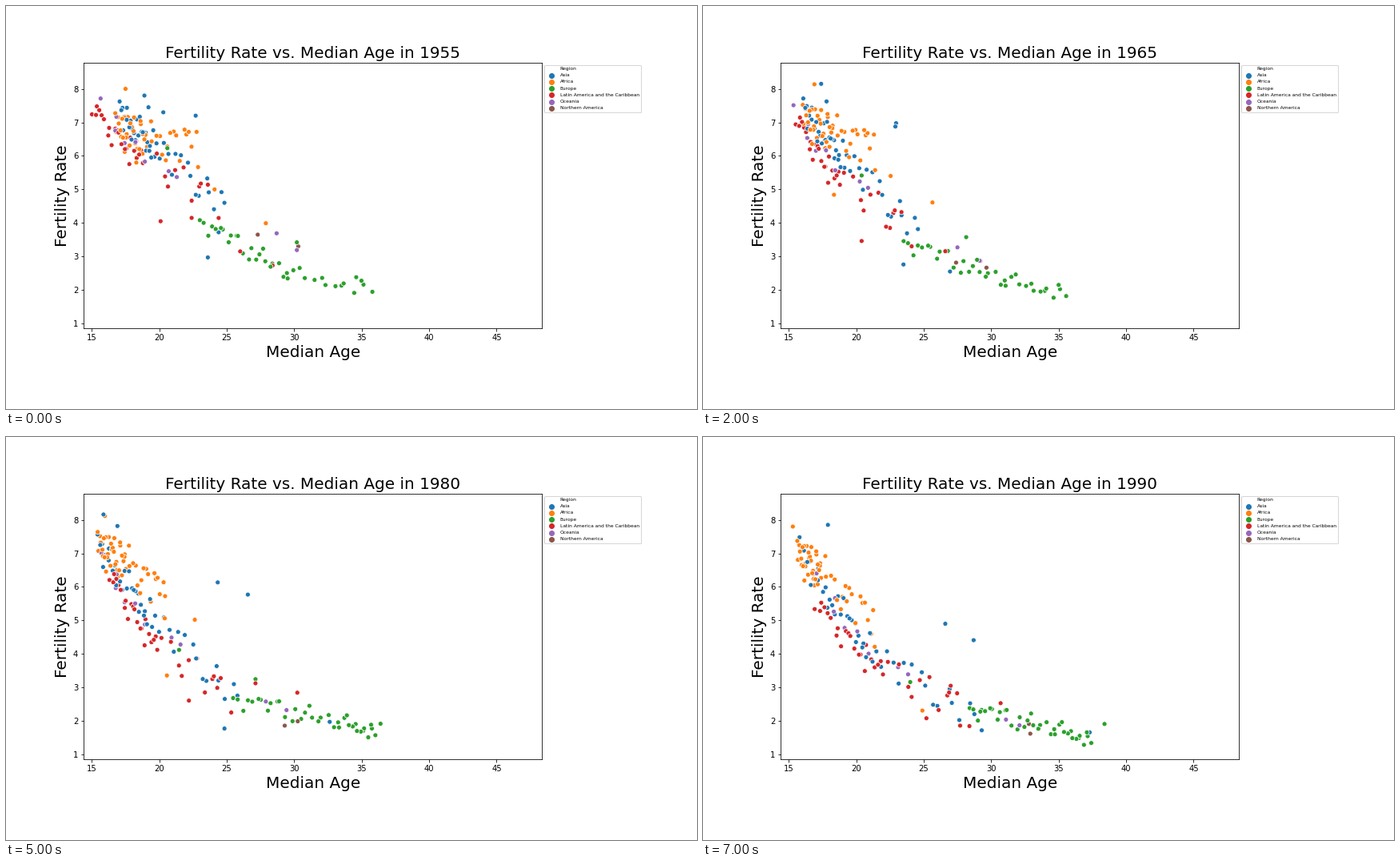
A matplotlib script for the animation above (8 s loop, 864 px wide and 504 px high).

```python
import numpy as np
import matplotlib.pyplot as plt
from matplotlib.animation import FuncAnimation

W, H, DPI = 864, 504, 72
KEY_YEARS = [1955, 1975, 1990]
KNOTS = [0, 0.65, 1]
rng = np.random.default_rng(7)


class Region:
    """Countries scattered along a spine that moves, plus a few lone tracks.

    A spine has three ages and three rates per key year,
    a track one (age, rate) per key year.
    """

    def __init__(self, name, colour, tracks, n=0, spread=0, spine=()):
        self.name, self.colour = name, colour
        lone = np.reshape(tracks, (-1, 3, 2)).swapaxes(0, 1)
        u = (np.arange(n) + rng.random(n)) / max(n, 1)
        noise = spread * rng.uniform(-1, 1, n)
        cloud = [np.column_stack([np.interp(u, KNOTS, ages),
                                  np.interp(u, KNOTS, rates) + noise])
                 for ages, rates in spine]
        self.keys = np.concatenate([lone, cloud], axis=1) if n else lone

    def at(self, year):
        i = 0 if year < KEY_YEARS[1] else 1
        t = (year - KEY_YEARS[i]) / (KEY_YEARS[i + 1] - KEY_YEARS[i])
        return (1 - t) * self.keys[i] + t * self.keys[i + 1]


regions = []


def add(*args):
    regions.append(Region(*args))


add("Asia", "#1f77b4",
    [[23.6, 2.97, 30.3, 2.13, 37.3, 1.66],
     [20.3, 7.30, 25.5, 6.45, 28.7, 4.41],
     [22.7, 7.20, 23.2, 6.75, 26.6, 4.90],
     [18.9, 7.80, 15.9, 8.50, 15.8, 7.48],
     [24.4, 3.72, 22.6, 1.80, 29.3, 1.72],
     [19.2, 7.45, 16.4, 7.80, 17.9, 7.85]],
    43, 0.5,
    [([17, 19.8, 25], [7.3, 6.2, 4.4]),
     ([15, 18.8, 24.5], [7.5, 5.5, 2.8]),
     ([16, 21.5, 29], [6.8, 3.9, 2.0])])
add("Africa", "#ff7f0e",
    [[18.3, 5.80, 18.4, 3.88, 24.9, 2.31],
     [27.9, 3.99, 23.4, 5.23, 21.1, 4.60],
     [24.1, 5.00, 21.0, 5.80, 19.3, 5.57],
     [17.5, 8.00, 16.3, 8.27, 15.3, 7.80]],
    50, 0.6,
    [([16.7, 19.1, 23], [6.7, 6.5, 6.2]),
     ([15.3, 17.6, 20], [7.2, 6.9, 6.0]),
     ([15.6, 17.4, 21.5], [6.8, 6.5, 4.7])])
add("Europe", "#2ca02c",
    [[20.6, 6.23, 20.2, 4.60, 24.0, 3.16],
     [30.2, 3.42, 26.1, 3.73, 29.2, 2.28],
     [34.6, 2.38, 35.4, 1.92, 38.4, 1.91]],
    37, 0.3,
    [([23, 29.8, 36], [4.0, 2.5, 2.05]),
     ([24, 33, 35.4], [2.75, 2.1, 1.8]),
     ([28.4, 35, 37.5], [2.3, 1.8, 1.45])])
add("Latin America and the Caribbean", "#d62728",
    [[28.4, 2.73, 30.0, 3.00, 30.7, 2.53],
     [26.0, 3.15, 27.2, 3.16, 27.0, 3.05],
     [22.4, 4.15, 22.6, 3.55, 27.7, 1.86],
     [20.1, 4.05, 20.7, 2.87, 25.2, 2.08]],
    33, 0.5,
    [([15, 18.8, 24.5], [7.1, 5.9, 4.5]),
     ([16, 18.8, 23.9], [6.5, 4.6, 2.8]),
     ([16.9, 22, 28.5], [5.2, 3.5, 2.2])])
add("Oceania", "#9467bd",
    [[28.7, 3.69, 26.3, 2.85, 31.1, 2.04],
     [30.2, 3.19, 28.1, 2.55, 32.1, 1.87]],
    8, 0.4,
    [([15.6, 18.6, 22.4], [7.4, 6.3, 5.2]),
     ([15, 17.6, 21.6], [7.0, 5.8, 4.5]),
     ([17, 20.5, 25.2], [6.1, 4.5, 3.15])])
add("Northern America", "#8c564b",
    [[27.3, 3.65, 27.5, 1.98, 32.9, 1.62],
     [30.3, 3.30, 29.0, 2.03, 32.8, 1.91]])

colours = np.concatenate([[r.colour] * r.keys.shape[1] for r in regions])
order = rng.permutation(len(colours))

fig = plt.figure(figsize=(W / DPI, H / DPI), dpi=DPI, facecolor="white")
left, right, top, bottom = 97.3, 670.4, 70.5, 403.3
ax = fig.add_axes([left / W, 1 - bottom / H, (right - left) / W, (bottom - top) / H])
ax.set_xlim(14.41, 48.38)
ax.set_ylim(0.85, 8.79)
ax.set_xticks(range(15, 46, 5))
ax.set_yticks(range(1, 9))
ax.set_xlabel("Median Age", fontsize=20)
ax.set_ylabel("Fertility Rate", fontsize=20)
title = ax.set_title("", fontsize=20)

dots = ax.scatter(np.zeros(len(order)), np.zeros(len(order)), s=36,
                  c=colours[order], edgecolors="white", linewidths=0.75)

handles = [ax.scatter([], [], color="white", label="Region")]
handles += [ax.scatter([], [], s=36, color=r.colour, linewidths=1, label=r.name)
            for r in regions]
ax.legend(handles=handles, loc="upper left", bbox_to_anchor=(1, 1), fontsize=6)


def draw(frame):
    year = 1955 + 5 * frame
    title.set_text(f"Fertility Rate vs. Median Age in {year}")
    dots.set_offsets(np.concatenate([r.at(year) for r in regions])[order])
    return title, dots


anim = FuncAnimation(fig, draw, frames=8, interval=1000, repeat=True, repeat_delay=0)
plt.show()
```
